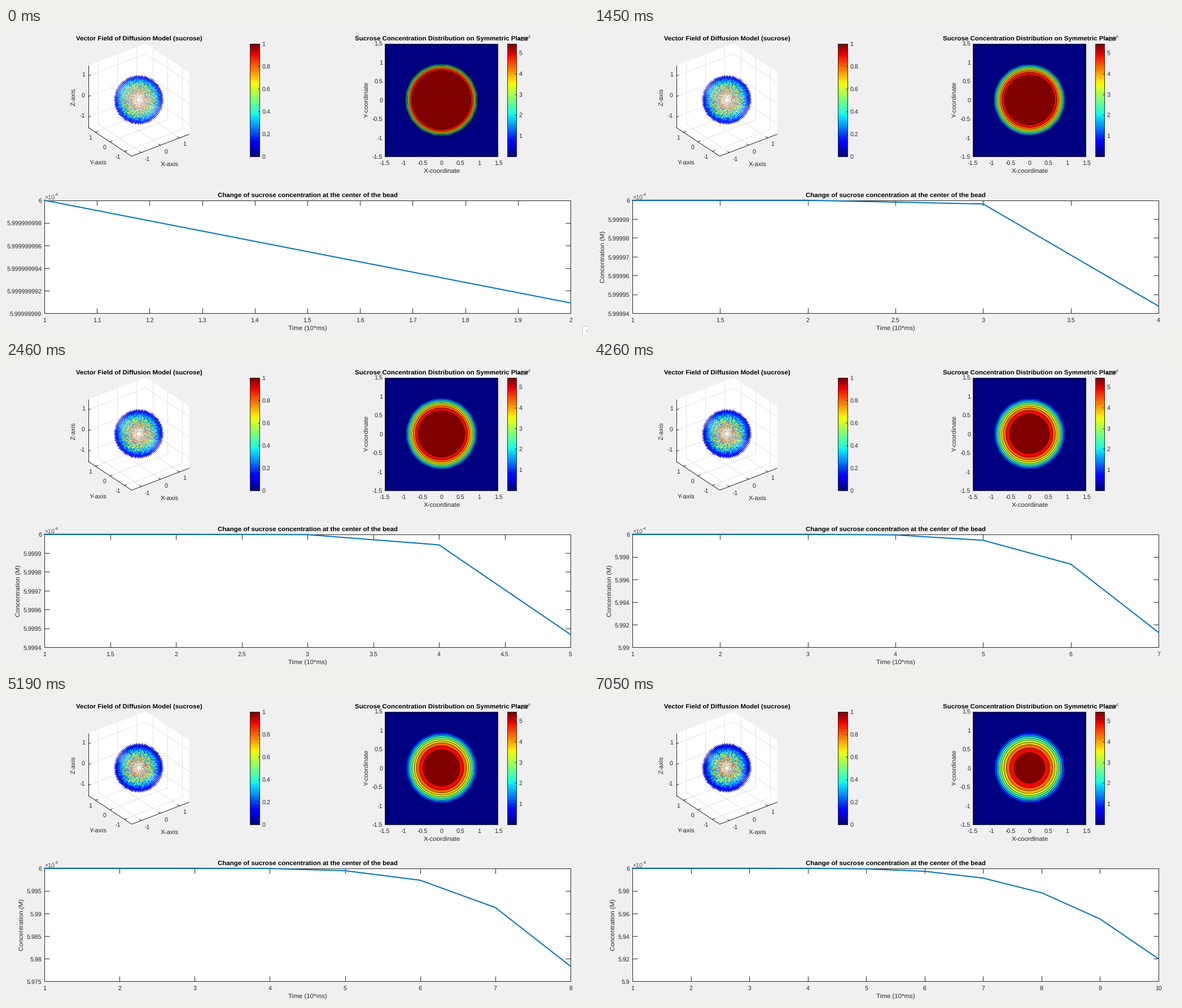
Recreate the animation shown at these times as a matplotlib script. Size 1031 px wide and 543 px high, loop 8 s.

```python
import math

import matplotlib.pyplot as plt
import numpy as np
from matplotlib.animation import FuncAnimation
from matplotlib.collections import LineCollection
from matplotlib.patches import Rectangle

W, H, DPI = 1031, 543, 64
PT = 72 / DPI                      # points per pixel
STEP, LOOP = 50, 8000
INK, GRID, BLUE = "#262626", "#e2e2e2", "#0072bd"
TICK, LABEL = 10.67, 11.45         # font heights in pixels

plt.rcParams["font.family"] = "Liberation Sans"
plt.rcParams["text.hinting"] = "no_hinting"
plt.rcParams["path.simplify"] = False
jet = plt.get_cmap("jet")

fig = plt.figure(figsize=(W / DPI, H / DPI), dpi=DPI, facecolor="#f0f0f0")
ax = fig.add_axes([0, 0, 1, 1])
ax.set(xlim=(0.4, W + 0.4), ylim=(H + 0.8, 0.8))
ax.axis("off")


def text(x, y, s, size=TICK, ha="center", color=INK, z=5, **kw):
    """Horizontal text whose capitals are centred on y."""
    return ax.text(x, y + 0.36 * size, s, fontsize=size * PT, ha=ha,
                   va="baseline", color=color, zorder=z, **kw)


def title(x, y, s):
    return text(x, y, s, LABEL, color="black", z=6, weight="bold")


def side_text(x, y, s):
    return ax.text(x + 1.8, y, s, fontsize=LABEL * PT, rotation=90,
                   ha="center", va="center", color=INK, zorder=5)


def lines(segs, color=INK, width=1, z=4):
    return ax.add_collection(
        LineCollection(segs, colors=color, linewidths=width * PT, zorder=z),
        autolim=False)


def box(x0, y0, x1, y1, fill="none", edge=INK, z=4):
    return ax.add_patch(Rectangle((x0, y0), x1 - x0, y1 - y0, facecolor=fill,
                                  edgecolor=edge, linewidth=PT, zorder=z))


def exponent(x, y):
    text(x, y, "×10", ha="left", color="#505050")
    text(x + 17.5, y - 4.5, "-4", 8, ha="left", color="#505050")


def colorbar(x0, x1, top, ticks):
    """Jet bar between y = 28 and y = 228 for values 0..top."""
    n = 64
    for k in range(n):
        y = 228.5 - 200 * (k + 1) / n
        ax.add_patch(Rectangle((x0, y), x1 - x0, 200 / n, linewidth=0,
                               facecolor=jet(k / (n - 1)), antialiased=False,
                               zorder=3))
    box(x0, 28.5, x1, 228.5)
    ys = [228.5 - 200 * t / top for t in ticks]
    lines([[(x1 - 3, y), (x1, y)] for y in ys])
    for t, y in zip(ticks, ys):
        text(x1 + 4, y, f"{t:g}", ha="left")


# ---- 3-D vector field -------------------------------------------------
CX, CY = 235.5, 128.3
VIEW = np.array([-0.527, -0.687, 0.5])      # towards the viewer


def project(x, y, z):
    return (CX + 34 * x - 25.67 * y, CY - 13 * x - 17 * y - 36.67 * z)


def draw_cage():
    a, t = 1.5, (-1, 0, 1)
    outline = [(-a, a, a), (a, a, a), (a, -a, a), (a, -a, -a),
               (-a, -a, -a), (-a, a, -a)]
    ax.fill(*zip(*[project(*p) for p in outline]), color="white", lw=0, zorder=1)
    grid = []
    for v in t:
        grid += [((v, -a, -a), (v, a, -a)), ((v, a, -a), (v, a, a)),
                 ((-a, v, -a), (a, v, -a)), ((a, v, -a), (a, v, a)),
                 ((-a, a, v), (a, a, v)), ((a, a, v), (a, -a, v))]
    lines([[project(*p), project(*q)] for p, q in grid], GRID, 1, 1.5)
    axes = [((-a, a, a), (-a, a, -a)), ((-a, a, -a), (-a, -a, -a)),
            ((-a, -a, -a), (a, -a, -a))]
    b = a - 0.13
    for v in t:
        axes += [((v, -a, -a), (v, -b, -a)), ((-a, v, -a), (-b, v, -a)),
                 ((-a, a, v), (-b, a, v))]
        text(284 + 33 * v, 219.5 - 13.5 * v, str(v))
        text(174.5 - 24.5 * v, 212 - 17 * v, str(v))
        text(140, 119.5 - 36.5 * v, str(v), ha="right")
    lines([[project(*p), project(*q)] for p, q in axes])
    text(290.5, 243, "X-axis", LABEL)
    text(163.5, 240, "Y-axis", LABEL)
    side_text(119, 123, "Z-axis")


def draw_field(n):
    """Radial arrows over the bead, reaching deeper as n grows."""
    rng = np.random.default_rng(4)
    g = np.arange(-12, 13) * 0.08
    p = np.array(np.meshgrid(g, g, g)).reshape(3, -1)
    r = np.linalg.norm(p, axis=0)
    p = p[:, (r > 0.6) & (r < 0.97)]
    p = p[:, np.argsort(VIEW @ p)]
    inner = np.array(project(*(p * (1 - 0.006 * (n - 2)))))
    tip = np.array(project(*(p * 1.08)))
    q = np.hypot(tip[0] - CX, tip[1] - CY) / 44
    v = np.clip(1 - q * q, 0, 1) ** (0.95 + 0.04 * n)
    v = np.clip(v * rng.uniform(0.15, 1.2, v.size) + 0.05, 0.04, 0.95)
    segs = np.stack([inner.T, tip.T], axis=1)
    return lines(segs, jet(v), 0.7, 3)


# ---- concentration on the plane --------------------------------------
ZS = np.linspace(0, 3, 601)
ERF = np.array([math.erf(z) for z in ZS])
THETA = np.linspace(0, 2 * np.pi, 181)


def draw_rings(n):
    width = 33 * (n / 10) ** 0.623
    out = []
    for k in range(1, 11):
        z = np.interp(k / 11, ERF, ZS)
        wobble = 0.4 * math.exp(-3 * z) * np.cos(16 * THETA)
        r = 66.5 - width * z - wobble
        out += ax.fill(771.8 + r * np.cos(THETA), 128.3 + r * np.sin(THETA),
                       facecolor=jet(k / 10), edgecolor="black",
                       linewidth=0.6 * PT, zorder=3)
    return out


def draw_plane():
    box(671.5, 28.5, 871.7, 228.5, fill=jet(0.0), z=2)
    for v in np.arange(-1.5, 1.6, 0.5):
        text(772 + 67 * v, 240, f"{v:g}")
        text(667.5, 128.5 - 67 * v, f"{v:g}", ha="right")
    text(772.5, 255, "X-coordinate", LABEL)
    side_text(638.5, 128, "Y-coordinate")


# ---- concentration at the centre -------------------------------------
X0, X1, Y0, Y1 = 68.4, 1000.4, 306.5, 506.7
DROP = [0, 9.1e-9, 1.96e-6, 5.63e-5, 5.33e-4, 2.65e-3, 8.7e-3, 0.0217,
        0.0449, 0.0803]
# n: (axis depth below 6, y intervals, x step)
SCALE = {2: (1e-8, 5, 0.1), 3: (2e-6, 4, 0.2), 4: (6e-5, 6, 0.5),
         5: (6e-4, 6, 0.5), 6: (3e-3, 6, 0.5), 7: (0.01, 5, 1),
         8: (0.025, 5, 1), 9: (0.05, 5, 1), 10: (0.1, 5, 1)}


def draw_curve(n):
    depth, parts, dx = SCALE[n]
    out, ticks, widest = [], [], 0
    for x in np.arange(1, n + dx / 2, dx):
        px = X0 + (X1 - X0) * (x - 1) / (n - 1)
        ticks += [[(px, Y0), (px, Y0 + 9)], [(px, Y1), (px, Y1 - 9)]]
        out.append(text(px, 518.5, f"{x:g}"))
    for j in range(parts + 1):
        py = Y0 + (Y1 - Y0) * j / parts
        ticks += [[(X0, py), (X0 + 9, py)], [(X1, py), (X1 - 9, py)]]
        s = f"{6 - depth * j / parts:.10g}"
        widest = max(widest, len(s))
        out.append(text(63.5, py + 0.8, s, ha="right"))
    out.append(lines(ticks))
    out.append(side_text(57 - 6 * widest, 407, "Concentration (M)"))
    xs = X0 + (X1 - X0) * np.arange(n) / (n - 1)
    ys = Y0 + (Y1 - Y0) * np.array(DROP[:n]) / depth
    out += ax.plot(xs, ys, color=BLUE, lw=2 * PT, zorder=4.5)
    return out


draw_cage()
title(235.8, 19, "Vector Field of Diffusion Model (sucrose)")
colorbar(432.5, 449.5, 1, (0, 0.2, 0.4, 0.6, 0.8, 1))

draw_plane()
exponent(905.5, 20)
title(772, 19, "Sucrose Concentration Distribution on Symmetric Plane")
colorbar(888.5, 904.7, 60 / 11, (1, 2, 3, 4, 5))

box(X0, Y0, X1, Y1, fill="white", edge="none", z=1)
box(X0, Y0, X1, Y1)
exponent(69, 300.5)
title(534.4, 297.8, "Change of sucrose concentration at the center of the bead")
text(534.4, 533.5, "Time (10*ms)", LABEL)

corner = [box(1021.5, 529.5, 1040, 550, fill="white", edge="#c4c4c4"),
          lines([[(1026, 537), (1031, 537)], [(1027, 540), (1031, 540)]],
                "#9a9a9a", 1, 5)]

states = {n: [draw_field(n), *draw_rings(n), *draw_curve(n)] for n in SCALE}
SWITCH = [330, 1450, 2460, 3390, 4260, 5190, 6120, 7050]


def update(i):
    t = i * STEP + STEP - 1
    now = 2 + sum(t >= s for s in SWITCH)
    for n, group in states.items():
        for artist in group:
            artist.set_visible(n == now)
    fade = 1 - sum(t >= s for s in (330, 395, 460)) / 3
    for artist in corner:
        artist.set_alpha(fade)
    return []


anim = FuncAnimation(fig, update, frames=LOOP // STEP, interval=STEP,
                     init_func=lambda: update(0), repeat=True, repeat_delay=0)
plt.show()
```
